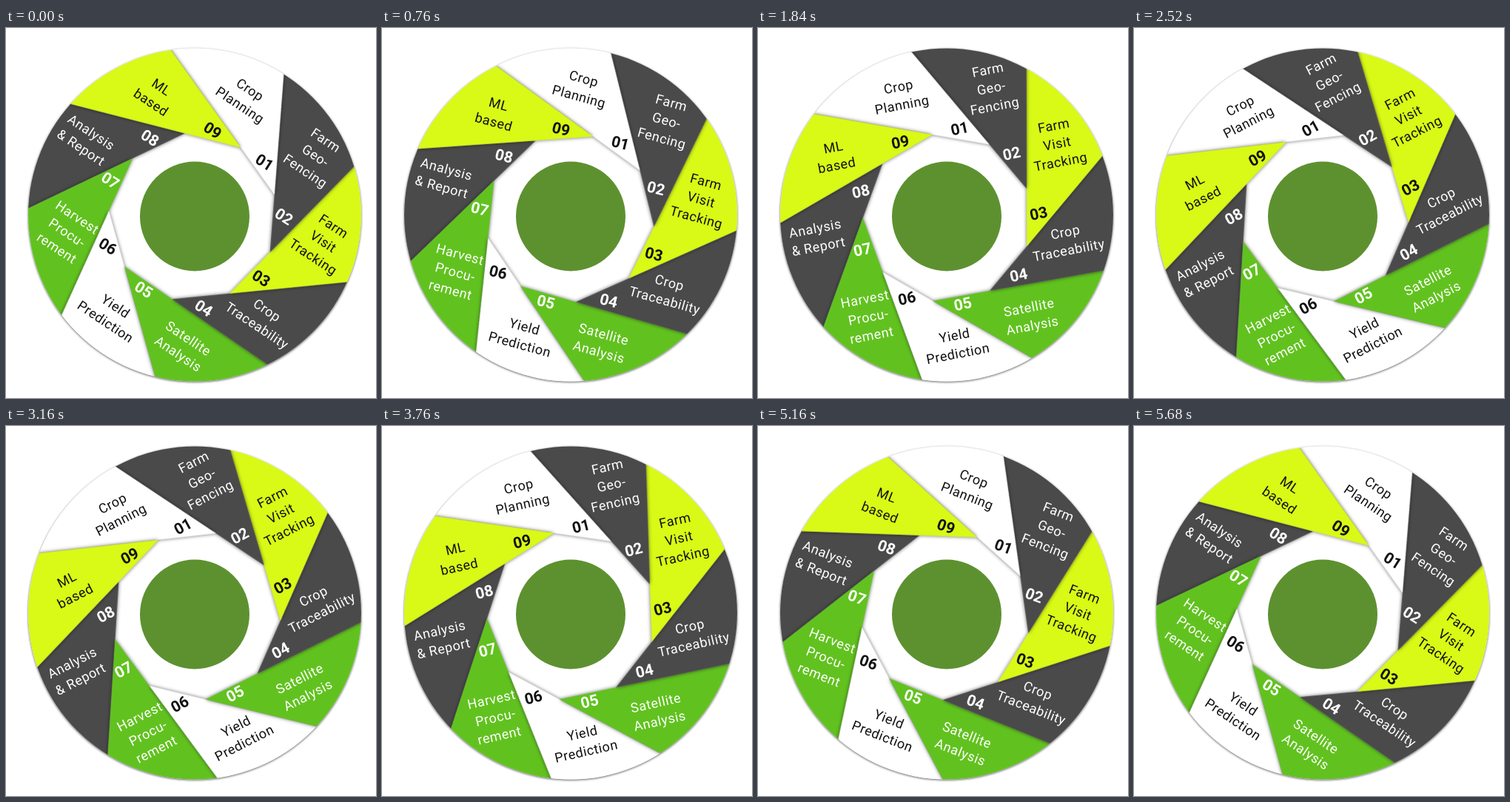
Animation of 500 by 500 pixels, one loop 5.72 s. Source, as an HTML page:

```html
<!DOCTYPE html>
<html lang="en">
<head>
<meta charset="utf-8">
<title>Farm services wheel</title>
<style>
  html, body { margin: 0; width: 100%; height: 100%; overflow: hidden; background: #fff; }
  svg { display: block; width: 500px; height: 500px; }
  text { font: 18px Roboto, sans-serif; letter-spacing: .55px; text-anchor: middle; }
  .num { font-size: 21px; font-weight: 700; letter-spacing: 0; }
  .disc { filter: drop-shadow(.8px 1.2px 1.6px #0009); }
  .blade { filter: drop-shadow(0 0 2.5px #0009); }
</style>
</head>
<body>
<svg viewBox="0 0 500 500">
  <clipPath id="rim"><circle r="225"/></clipPath>
  <g class="disc" transform="translate(255 252.5)">
    <circle r="225" fill="#fff"/>
    <g clip-path="url(#rim)"><g id="wheel"></g></g>
  </g>
  <circle cx="255" cy="254.5" r="74" fill="#5d9130"/>
</svg>
<script>
const WHITE = '#fff', BLACK = '#111', DARK = '#4a4a4a', LIME = '#d9f916', GREEN = '#61c21f';
const LOOP = 5720, STEP = 40, SWING = 5672, SPEED = 0.0242, START = 32.2;
const LINE = 24.9, TEXT_TILT = 1.5;

// fill, ink, number centre, first text line centre, lines
const blades = [
  [WHITE, BLACK, 42, -110.5, -27, -183, 'Crop|Planning'],
  [DARK, WHITE, 103.3, -62.5, 95.5, -179.6, 'Farm|Geo-|Fencing'],
  [LIME, BLACK, 121.8, 24.5, 166.4, -87, 'Farm|Visit|Tracking'],
  [DARK, WHITE, 77.6, 100, 151.3, 57, 'Crop|Traceability'],
  [GREEN, WHITE, -4.4, 122, 81.6, 146, 'Satellite|Analysis'],
  [WHITE, BLACK, -76.7, 98.4, -24.8, 161.5, 'Yield|Prediction'],
  [GREEN, WHITE, -121.3, 21.2, -133, 87.5, 'Harvest|Procu-|rement'],
  [DARK, WHITE, -106.5, -56, -178, -20, 'Analysis|& Report'],
  [LIME, BLACK, -40.4, -109.8, -130.5, -122, 'ML|based']
];

const label = (x, y, ink, str, cls = '') =>
  `<text class="${cls}" x="${x}" y="${y}" fill="${ink}">${str.replace('&', '&amp;')}</text>`;

// Blade edges are the extended sides of an inner nine-sided polygon.
const shape = n => `<path class="blade" fill="${blades[n - 1][0]}" d="M-230-107.3H39L-107.2-230Z"
  transform="translate(0 4) rotate(${40 * n - 17.8})"/>`;

function captions([, ink, nx, ny, x, y, str], i) {
  const lines = str.split('|');
  const middle = y + (lines.length - 1) * LINE / 2;
  return label(nx, ny + 7.5, ink, '0' + (i + 1), 'num') +
    `<g transform="rotate(${TEXT_TILT} ${x} ${middle})">` +
    lines.map((s, j) => label(x, y + 6.2 + j * LINE, ink, s)).join('') + '</g>';
}

const wheel = document.getElementById('wheel');
wheel.innerHTML = [8, 7, 6, 5, 4, 3, 2, 1, 9].map(shape).join('') + blades.map(captions).join('');

const begin = performance.now();
function draw() {
  const elapsed = (performance.now() - begin) % LOOP;
  const t = Math.floor(elapsed / STEP) * STEP;
  const angle = START - SPEED * Math.min(t, SWING - t);
  wheel.setAttribute('transform', `rotate(${angle})`);
  requestAnimationFrame(draw);
}
draw();
</script>
</body>
</html>
```
